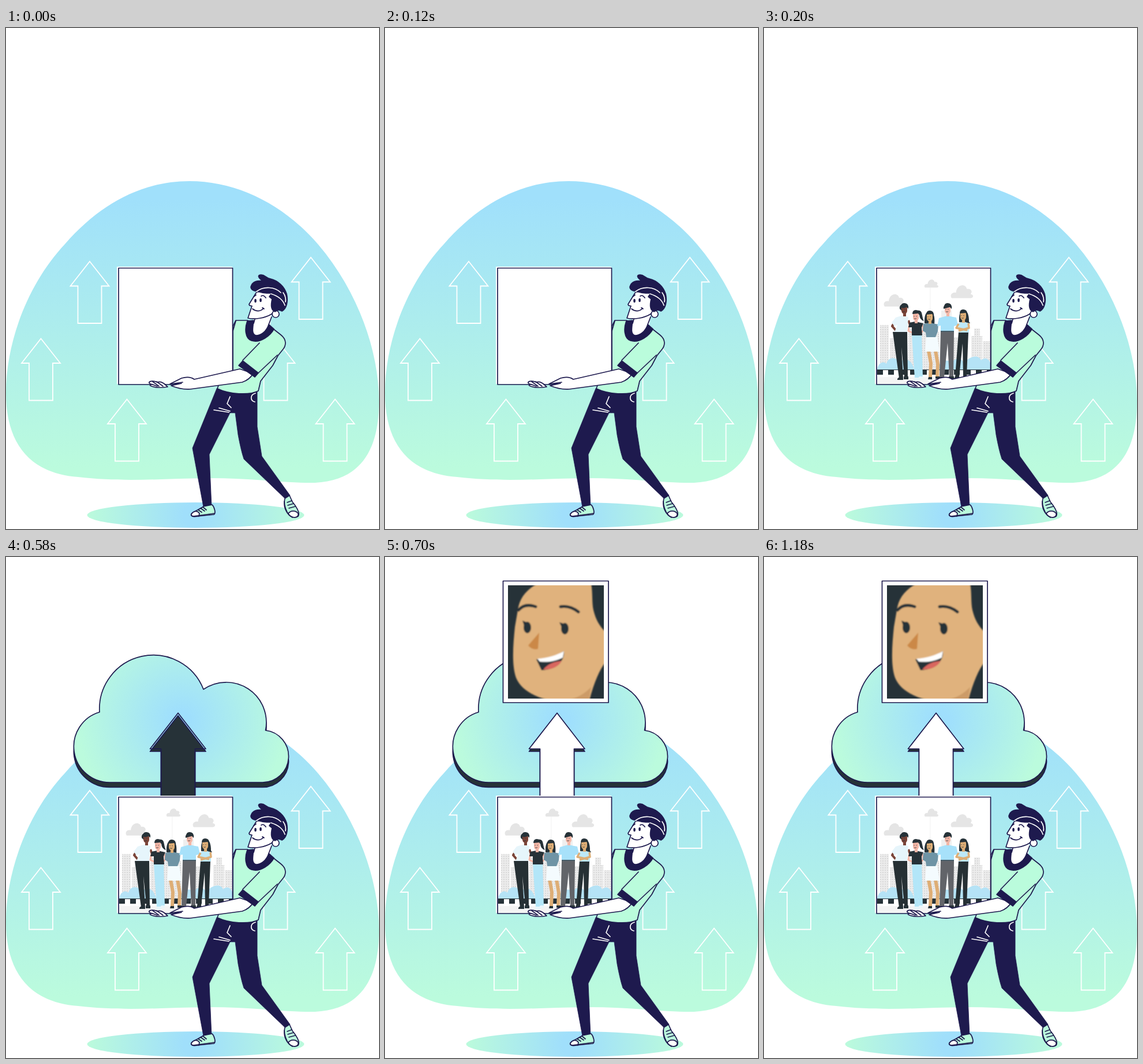
Write an HTML page that moves like this. It is 646 by 867 pixels and loops after 1.5 s.

```html
<!DOCTYPE html>
<html lang="en">
<head>
<meta charset="utf-8">
<title>Cloud upload</title>
<style>
html, body { margin: 0; width: 100%; height: 100%; overflow: hidden; background: #fff; }
svg { display: block; width: 100%; height: 100%; }
.line { fill: none; stroke: #1e1a4e; stroke-width: 1.7; stroke-linecap: round; stroke-linejoin: round; }
.white { fill: #fff; }
.mint { fill: #bafcdc; }
.navy { fill: #1e1a4e; }
.dark { fill: #263238; }
.chalk { fill: none; stroke: #fff; stroke-width: 1.7; stroke-linecap: round; stroke-linejoin: round; }
</style>
</head>
<body>
<svg viewBox="0 0 646 867">
  <defs>
    <linearGradient id="sky" x2="0" y2="1">
      <stop offset=".06" stop-color="#a0e0fb"/>
      <stop offset=".95" stop-color="#bbfbdd"/>
    </linearGradient>
    <radialGradient id="floor" gradientUnits="userSpaceOnUse" cx="325" cy="843" r="180">
      <stop offset=".1" stop-color="#a0dffb"/>
      <stop offset="1" stop-color="#bafadc"/>
    </radialGradient>
    <radialGradient id="glow" gradientUnits="userSpaceOnUse" cx="304" cy="282" r="182">
      <stop offset=".08" stop-color="#9fdffd"/>
      <stop offset="1" stop-color="#bbfbdd"/>
    </radialGradient>
    <pattern id="windows" width="4" height="4" patternUnits="userSpaceOnUse">
      <rect width="4" height="4" fill="#ececec"/>
      <rect x="1" y="1" width="2" height="2" fill="#d8d8d8"/>
    </pattern>
    <path id="outline" d="M0 0l33.500 42.500h-13v64.500h-41v-64.500h-13z"/>
    <path id="cloudShape" d="M180 390A62 62 0 0 1 162 268.500A93.300 93.300 0 0 1 342 229A69.500 69.500 0 0 1 449.500 300A45.150 45.150 0 0 1 444 390Z"/>
    <path id="upShape" d="M298 270L346 332H327.500V416H268.500V332H249.500Z"/>
    <path id="puff" d="M-17 11C-21 6-16 0-10 2C-9-12 6-14 8-4C15-6 18 1 14 4C21 6 18 11 14 11Z"/>
    <clipPath id="boxClip"><path d="M196 416h196v200H196z"/></clipPath>
    <clipPath id="faceClip"><path d="M213 49h166v196H213z"/></clipPath>
    <filter id="soft"><feGaussianBlur stdDeviation="1"/></filter>
  </defs>

  <path fill="url(#sky)" d="M318 265C400 265 481 305 541 375C610 456 646 560 646 646C646 730 615 783 535 787C485 788 420 778 345 779C270 780 200 786 125 777C42 771 0 720 0 632C0 540 40 440 102 374C162 305 235 265 318 265Z"/>
  <ellipse cx="328.500" cy="843" rx="188" ry="22" fill="url(#floor)"/>
  <g id="outlines" fill="none" stroke="#fff" stroke-width="1.800"></g>

  <g id="cloud">
    <use href="#cloudShape" y="8.500" class="line" style="fill:#263238"/>
    <use href="#cloudShape" class="line" style="fill:url(#glow)"/>
    <use href="#upShape" y="4.500" class="line" style="fill:#263238"/>
    <use id="up" href="#upShape" class="line"/>
  </g>

  <g id="portrait">
    <rect x="204.500" y="41.500" width="182.500" height="210.500" class="line" style="fill:#fff"/>
    <g clip-path="url(#faceClip)">
      <path class="dark" d="M213 49h166v196H213z"/>
      <g filter="url(#soft)">
        <path fill="#e0b27d" d="M230 92C233 72 243 58 264 46H357C360 62 358 78 361 92C365 108 371 119 382 130V182C372 194 362 217 354 248H284C257 241 235 229 227 209C219 186 222 151 225 121Z"/>
        <path fill="#cc9b68" d="M318 247C334 244 346 236 357 225L353 248Z"/>
        <path fill="none" stroke="#263238" stroke-width="5" stroke-linecap="round" d="M231 92C239 83 250 82 261 86M304 86C316 84 326 88 335 95"/>
        <path class="dark" d="M238 110l10 4l-6 8zM302 113l10 3l-5 8z"/>
        <ellipse class="dark" cx="246.500" cy="122" rx="6.500" ry="10"/>
        <ellipse class="dark" cx="311.500" cy="124" rx="6.500" ry="10"/>
        <path fill="#cb8847" d="M267 131L248 153C252 159 260 161 265 159Z"/>
        <path class="dark" d="M262 177C281 176 297 171 310 163C311 182 295 195 271 196Z"/>
        <path class="white" d="M264 176C282 175 297 170 310 163L308 174C296 180 283 183 268 181Z"/>
        <path fill="#d9665e" d="M274 195C281 185 296 180 306 180C300 191 287 195 274 195Z"/>
      </g>
    </g>
  </g>

  <path class="white" d="M192 413h200v203H192z"/>
  <g id="photo" clip-path="url(#boxClip)">
    <g fill="#e5e5e5">
      <use href="#puff" transform="translate(226 471)"/>
      <use href="#puff" transform="translate(290 442) scale(.66)"/>
      <use href="#puff" transform="translate(343 456) scale(1.050)"/>
      <path d="M287.500 449h.8v60h-.8zM307 505v-16h18v16z" opacity=".6"/>
    </g>
    <path fill="url(#windows)" d="M201 591V514h15V591zM218 591V537h14V591zM250 591V519h14V591zM272 591V526h32V591zM325 591V535h14V591zM359 591V533h5V520h10V533h4V591zM379 591V542h12V591z"/>
    <path fill="#b5e3f6" d="M196 591C198 578 208 576 212 581C216 567 231 570 234 579C247 567 257 577 260 591ZM300 591C306 572 321 573 325 580C333 568 343 571 346 580C359 565 373 566 376 575C386 566 394 577 394 591Z"/>
    <path stroke="#263238" stroke-width="9" stroke-dasharray="10 9" d="M196 595.500H392"/>
    <path stroke="#263238" stroke-width="1" d="M196 591.500H392"/>
    <path fill="#f4f4f4" d="M196 604h196v12H196z"/>
    <g id="people"></g>
  </g>
  <rect x="195" y="415.500" width="197.500" height="201.500" class="line"/>

  <g id="man" class="line">
    <path class="navy" stroke-width=".8" d="M365 624L323 727L342 829H356L352 738L388 666H397L402 704C405 720 408 734 412 746L484 815L492 809L443 741L435 690V626Z"/>
    <path class="chalk" d="M388 638L383 650L390 657M360 661L386 665M369 657.500L388 663M432 632C422 635 423 645 431 647"/>
    <path class="mint" d="M342 828C336 833 325 836 321 841C319 845 324 846 331 845L360 842C364 840 361 829 357 825Z"/>
    <path class="white" d="M321 841C325 836 331 834 335 840L334 845C325 846 320 845 321 841Z"/>
    <path d="M324 845L361 840M337 831l7 5M341 829l6 5M333 834l6 4"/>
    <path class="mint" d="M483 814C481 821 483 830 487 838C492 846 500 849 506 845C510 839 502 827 496 820L491 809Z"/>
    <path class="white" d="M489 840C493 835 501 834 506 840C507 845 503 847 499 847C494 846 490 843 489 840Z"/>
    <path d="M482 819C481 830 486 842 496 847M487 821l8-3M488 826l10-3M490 831l11-3"/>

    <path class="mint" d="M393 516L398 506H418L462 520L476 531C486 539 486 549 479 557L471 567L462 584L441 611L437 628C421 636 387 634 366 624L370 613L393 598Z"/>
    <path d="M393 524L398 507"/>
    <path class="white" stroke="none" d="M429 500L426 526L434 534C445 532 453 524 458 512L460 492Z"/>
    <path class="navy" d="M418 507C413 520 414 537 425 541C441 546 458 532 464 521L455 513C451 525 442 532 434 532C425 532 427 520 429 506Z"/>
    <path d="M431 504L429 511M455 513L460 500"/>

    <path class="white" d="M405 590L326 608C319 603 311 604 304 606L284 616L304 615L286 619C296 623 308 626 319 625L409 613C418 610 424 605 428 598Z"/>
    <path d="M285 616L306 613"/>
    <path class="white" d="M248 613C250 610 257 611 262 613C268 611 273 614 280 621C268 623 258 623 250 619C248 617 252 617 254 617C250 616 247 615 248 613Z"/>
    <path d="M254 612L265 620M261 612L272 620M254 617L262 620"/>
    <path class="mint" d="M438 546L410 575L437 597L471 566Z" stroke="none"/>
    <path d="M439 545L410 575M437 597L470 566"/>
    <path class="navy" d="M410 576L437 597L431 604L403 584Z"/>

    <path class="white" d="M434 457L421 478C421 480 423 481 426 481L419 502C430 505 449 502 460 495L470 484L466 455Z"/>
    <circle class="white" cx="467" cy="495" r="6"/>
    <path class="navy" d="M424 448C427 438 435 437 445 438C436 432 435 427 442 427C449 427 450 433 458 434C471 437 482 447 486 460C489 473 486 486 478 490C473 487 469 488 466 491C458 488 459 477 461 469L456 465L460 459C450 459 440 458 436 455C430 456 424 453 424 448Z"/>
    <path class="chalk" d="M434 456C447 446 466 448 476 458M459 460C472 464 480 471 483 480M480 458C484 463 485 470 484 474"/>
    <path d="M427 486C433 491 441 491 446 485M444 484l3 2M429 465l4-3M442 464q4-3 8 3"/>
    <ellipse class="navy" stroke="none" cx="432" cy="472" rx="1.800" ry="3.200"/>
    <ellipse class="navy" stroke="none" cx="441" cy="471" rx="1.800" ry="3.200"/>
  </g>
</svg>
<script>
const LOOP = 1500;
const byId = id => document.getElementById(id);
const [cloud, portrait, photo, up] = ["cloud", "portrait", "photo", "up"].map(byId);

const tips = [[145, 404], [528, 397], [60.5, 537.5], [209.5, 642.5], [570, 642.5], [467, 537.5]];
byId("outlines").innerHTML = tips.map(([x, y]) => `<use href="#outline" x="${x}" y="${y}"/>`).join("");

const ink = "#263238";
const shape = (fill, d) => `<path fill="${fill}" d="${d}"/>`;
const limb = (color, width, d) =>
  `<path fill="none" stroke="${color}" stroke-width="${width}" stroke-linejoin="round" d="${d}"/>`;

// Head with a short fringe, two eyes and a smile.
const head = (x, y, skin) =>
  shape(skin, `M${x - 5} ${y - 6}h10v9q-1 5-5 5q-5-1-5-6zM${x - 2} ${y + 5}h5v7h-5z`) +
  shape(ink, `M${x - 6} ${y - 4}q0-7 6-7q8 0 7 10l-3-4z`) +
  limb(ink, .8, `M${x - 3} ${y - 1}v1.500m4-1.500v1.500m-4 3q2 2 4 0`);

const people = [
  // Tall man on the left
  limb("#7a4438", 4, "M227 507L222 516L229 524M250 506L253 514") +
  shape("#263034", "M223 526L248 525L249 603H243L238 552L241 606H234Z") +
  shape("#e6f5fb", "M228 501L238 498L250 500L248 526H226L231 514L226 516L221 510Z") +
  shape(ink, "M231 607q4-5 10-3v5h-10zM242 603h8v5h-8z") +
  head(243, 487, "#7a4438") + shape(ink, "M235 486q-1-8 7-8q9-1 8 7l-3-2q-5 3-9 1v5z"),

  // Woman with a ponytail
  shape(ink, "M265 489q8-2 9 8q1 7 3 10q-8-2-8-12z") +
  limb("#f3b6a6", 3, "M252 513L250 524L258 528M274 513L276 523L270 530") +
  shape("#b3e6f8", "M256 531H273L275 604H268L265 550L268 606H261Z") +
  shape(ink, "M252 510L262 508L276 511L273 518L274 532H256V518H250Z") +
  shape("#e8f6fb", "M261 605h8v5h-9zM269 603h6v4h-6z") +
  head(263, 499, "#f3b6a6"),

  // Woman with long hair
  shape(ink, "M278 511Q277 490 287 491Q297 491 295 513Z") +
  limb("#deae76", 6, "M285 558L289 580L288 604M297 558L301 582L300 604") +
  shape("#f4fbfe", "M281 534H300L304 560H279Z") +
  shape("#6f94a5", "M276 512L287 510L302 513L301 525L297 535H281L280 527L275 524Z") +
  shape(ink, "M285 604h6v4h-7zM297 603h7v4h-7z") +
  head(287, 500, "#deae76"),

  // Man in a blue shirt
  shape("#626469", "M306 524H329L328 604H321L318 545L312 605H304Z") +
  shape("#a7e1fa", "M303 502L317 498L333 501L336 514L329 516V526H306V515L300 516Z") +
  limb(ink, 1.5, "M306 525H329") +
  shape(ink, "M304 604h8v4h-10zM320 603h9v4h-9z") +
  head(318, 487, "#f3b6a6") + shape(ink, "M311 486q-1-8 8-8q7 0 6 8l-3-3z"),

  // Woman with folded arms
  shape(ink, "M338 509Q337 488 346 489Q355 489 355 508L357 511Z") +
  shape("#263034", "M337 526H354L351 603H345L344 546L338 604H331Z") +
  shape("#bde9f9", "M336 511L346 508L355 511V527H337Z") +
  limb("#deae76", 3.5, "M337 512L333 519L352 523M354 511L355 519L337 524") +
  shape(ink, "M331 603h7v4h-9zM345 602h7v4h-7z") +
  head(345, 498, "#deae76")
];
byId("people").innerHTML = people.join("");

const show = (node, on) => { node.style.display = on ? "" : "none"; };

function update(t) {
  show(photo, t >= 200);
  show(cloud, t >= 400);
  show(portrait, t >= 700);
  up.style.fill = t >= 700 ? "#fff" : "none";
}

const start = performance.now();
function tick() {
  update((performance.now() - start) % LOOP);
  requestAnimationFrame(tick);
}
tick();
</script>
</body>
</html>
```
